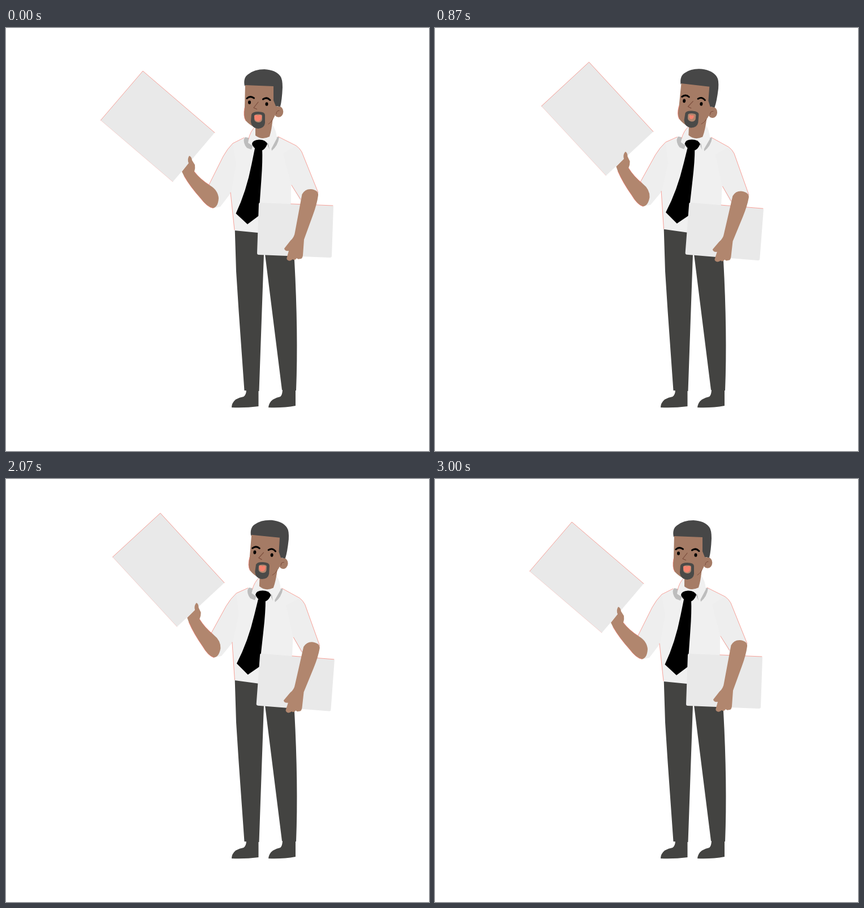
Recreate the animation shown at these times as an HTML page with a canvas. Size 748 by 748 pixels, loop 3.03 s.

```html
<!DOCTYPE html>
<html lang="en">
<head>
<meta charset="utf-8">
<title>Man with boards</title>
<style>
  html, body { margin: 0; width: 100%; height: 100%; overflow: hidden; background: #fff; }
  canvas { display: block; width: 748px; height: 748px; }
</style>
</head>
<body>
<canvas id="stage" width="748" height="748"></canvas>
<script>
const ctx = document.getElementById('stage').getContext('2d');
const LOOP = 3030, END = 3000, RAD = Math.PI / 180;

const C = {
  dark: '#434341', hair: '#474747', beard: '#4a4a48',
  skin: '#b1866e', neck: '#a67c66', face: '#a57b65', line: '#7a4c3c',
  shirt: '#f0f0f0', sleeve: '#eeeeee', fold: '#bdbdbd', board: '#e9e9e9',
  lips: '#f5826e', rim: 'rgba(246,120,108,.75)'
};

const fill = (d, color) => {
  ctx.fillStyle = color;
  ctx.fill(new Path2D(d));
};

const stroke = (d, color, width) => {
  ctx.strokeStyle = color;
  ctx.lineWidth = width;
  ctx.lineCap = ctx.lineJoin = 'round';
  ctx.stroke(new Path2D(d));
};

const rim = d => stroke(d, C.rim, 0.9);

const oval = (x, y, rx, ry, color) => {
  ctx.fillStyle = color;
  ctx.beginPath();
  ctx.ellipse(x, y, rx, ry, 0, 0, 7);
  ctx.fill();
};

// Draw a part turned clockwise by deg around (x, y)
const turned = (x, y, deg, draw) => {
  ctx.save();
  ctx.translate(x, y);
  ctx.rotate(deg * RAD);
  ctx.translate(-x, -y);
  draw();
  ctx.restore();
};

const ramp = (t, a, b) => Math.min(1, Math.max(0, (t - a) / (b - a)));

function legs() {
  fill('M404.500 350 L407 430 L411.500 500 L421.500 641 L447.500 642 L456 400 L458 400 L488 640 L513 641 Q517 540 510 411 L506 352 Z', C.dark);
  fill('M425 639 H446.500 V669 Q424 672 399 671 Q399 663 406 657 Q413 653 420 652 Q425 649 425 639 Z', C.dark);
  fill('M489 638 H512 V668 Q490 672 464 671 Q465 662 472 657 Q479 653 485 652 Q489 649 489 638 Z', C.dark);
}

function torso() {
  fill('M401 204 L421 194 L481 192 L513 208 L504 277 L504 363 L445 362 L404 358 L397 291 Z', C.shirt);
  fill('M401 204 Q391 214 384 227 L359 277 L370 318 L379 316 L398 291 L407 240 Z', C.sleeve);
  fill('M490 222 L513 208 Q519 212 523 219 L552 291 L549 298 L521 306 L504 277 Z', C.sleeve);
  rim('M421 194 L401 204 Q391 214 384 227 L359 277 M397 291 L404 357');
  rim('M481 192 L513 208 Q519 212 523 219 L552 291 M505 278 L521 303');
}

function collar() {
  fill('M423 193 Q418 198 423 208 L426 212 L434 215 L438 204 L428 194 Z', C.fold);
  fill('M460 202 L466 215 L464 204 Z', C.fold);
  fill('M479 193 L483 193 Q481 208 470 217 L469 212 Z', C.fold);
  fill('M440 175 Q431 183 428 203 L434 207 L448 197 L462 201 L469 214 L479 195 Q478 179 470 170 Z', C.shirt);
  rim('M440 175 Q432 183 429 196');
  fill('M441 172 L441 190 Q452 199 466 192 Q470 180 472 158 Z', C.neck);
}

function tie() {
  fill('M440 213 L453 213 Q454 235 451.500 268 L447 332 L427 347 L406.500 328 Q425 289 434.500 240 Z', '#000');
  fill('M435 205 Q436 198 447 197.500 Q459 197 462 205 Q459 213 454 216 L443 215 Q437 211 435 205 Z', '#000');
}

function mouth(m) {
  const w = 6.3 * m, h = 6 * m, x = 445.5, y = 159;
  const belly = w * m * 0.6;
  ctx.fillStyle = C.lips;
  ctx.beginPath();
  ctx.moveTo(x - w, y - h * 0.7);
  ctx.quadraticCurveTo(x - w * 0.4, y - h * 1.1, x, y - h * 0.65);
  ctx.quadraticCurveTo(x + w * 0.4, y - h * 1.1, x + w, y - h * 0.7);
  ctx.bezierCurveTo(x + w * 1.1, y + h * 0.5, x + belly, y + h, x, y + h);
  ctx.bezierCurveTo(x - belly, y + h, x - w * 1.1, y + h * 0.5, x - w, y - h * 0.7);
  ctx.fill();
}

function head(m) {
  oval(482, 148, 8.3, 9.8, C.face);
  stroke('M478 152 Q478 146 483 146', C.line, 1);
  fill('M423 98 L478 100 L479 140 Q477 160 465 169 Q456 178 445 178 Q432 173 424 164 Q419 156 422 141 Z', C.face);
  rim('M422 141 Q419 156 424 164');
  stroke('M472 161 Q469 167 464 170', C.line, 0.9);
  fill('M422 103 Q419 88 428 82 Q439 73 457 73 Q477 74 485 85 Q489 90 489 105 Q488 128 485 139 L477 138 L473 128 V103 L423 101 Z', C.hair);
  oval(430.5, 131.5, 2.5, 3.3, '#000');
  oval(461, 134.5, 2.5, 3.3, '#000');
  stroke('M426 124.500 Q432 119 438.500 124', '#000', 3);
  stroke('M454.500 126 Q461 121 467 127.500', '#000', 3);
  stroke('M446 131 L438 141 L443.500 143.500', C.line, 1.2);
  fill('M434 153 Q436 148 446 148 Q458 148 458 154 V168 Q457 177 446 178 Q434 177 433 165 Z', C.beard);
  fill('M439 155 Q440 152.500 446 152.500 Q453 152.500 453 155 V162 Q452 167 446 167 Q439 166 439 161 Z', C.skin);
  mouth(m);
}

function raisedArm() {
  fill('M242 76 L369 185 L295 272 L167.500 163 Z', C.board);
  rim('M167.500 163 L242 76 L369 185');
  ctx.globalAlpha = 0.4;
  rim('M167.500 163 L295 272');
  ctx.globalAlpha = 1;
  fill('M324 226 Q328 227 329 234 L334 242 Q335 248 333 254 Q344 268 361 278.500 Q375 287 376 301 Q375 317 366 318.500 Q356 317 344 301 Q326 281 315 262 L311 254 L323 239 Q320 232 324 226 Z', C.skin);
  rim('M333 254 Q344 268 360 278 M315 262 Q326 281 344 301 Q356 317 366 318.500');
}

function loweredArm() {
  fill('M449 309 L577 314 Q579 314 579 316 L576 403 Q576 406 573 406 L447 401 Q444 401 444 398 L447 311 Q447 309 449 309 Z', C.board);
  rim('M504 311 L578 314');
  fill('M523.500 294 Q529 284 540 285 Q553 287 552 296 Q550 311 543 330 L527 374 L525 402 Q524 409 520 408 Q517 410 514 407 Q511 412 507 409 Q502 413 499 411 Q495 409 497 405 L500 394 Q493 395 492 390 L503 376 Q510 370 511 361 Z', C.skin);
}

function draw(t) {
  const lean = 2.4 * (ramp(t, 0, 600) - ramp(t, 2000, END));
  const nod = 2 * (ramp(t, 0, 600) - ramp(t, 1850, 2400));
  const lift = 7.3 * (1 - Math.abs(t / 1500 - 1));
  const open = 0.25 + 0.75 * Math.pow(0.5 + 0.5 * Math.cos(t / 1000 * 2 * Math.PI), 3.5);

  ctx.fillStyle = '#fff';
  ctx.fillRect(0, 0, 748, 748);
  legs();
  turned(455, 365, lean, () => {
    torso();
    collar();
    turned(483, 140, nod, () => head(open));
    tie();
    loweredArm();
    turned(357, 313, lift, raisedArm);
  });
}

const start = performance.now();
function tick() {
  const ms = (performance.now() - start) % LOOP;
  const step = Math.floor((ms + 3.4) * 0.03) / 0.03;
  draw(Math.min(step, END));
  requestAnimationFrame(tick);
}
tick();
</script>
</body>
</html>
```
